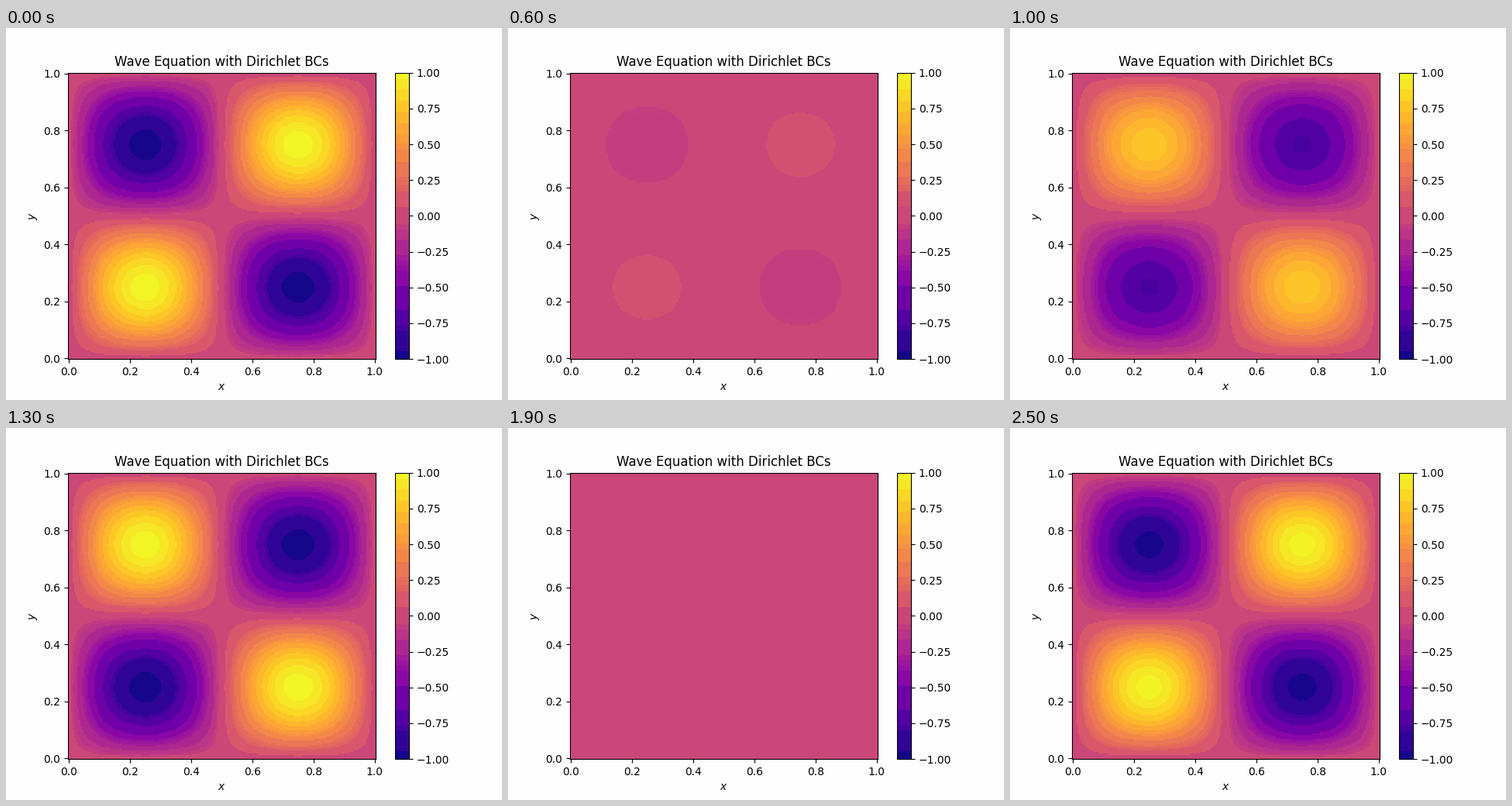
Animation of 640x480 px, one loop 2600 ms. Source, as a matplotlib script:

```python
import numpy as np
import matplotlib.pyplot as plt
from matplotlib.animation import FuncAnimation
from matplotlib.colors import ListedColormap

FRAMES = 26
INTERVAL = 100
CELLS = 201
START_PHASE = 1.5    # degrees
PHASE_STEP = 13.97   # degrees per frame
BAR_WEIGHT = 27      # colorbar pixels per colour
CELL_WEIGHT = 396.8 * 369.6 / CELLS**2

axis = np.linspace(0, 1, CELLS)
x, y = np.meshgrid(axis, axis)
mode = np.sin(2 * np.pi * x) * np.sin(2 * np.pi * y)

plasma = np.round(plt.get_cmap("plasma")(np.arange(256))[:, :3] * 255).astype(int)
# Coarse colour cells: 3 bits of red, 4 of green, 3 of blue.
_, cell_of = np.unique(plasma // [32, 16, 32], axis=0, return_inverse=True)
cell_of = cell_of.ravel()


def displacement(frame):
    return mode * np.cos(np.radians(START_PHASE + PHASE_STEP * frame))


def banded_cmap(field):
    """Plasma reduced to the mean colour of each coarse colour cell."""
    index = np.clip((field + 1) * 128, 0, 255).astype(int)
    weight = BAR_WEIGHT + CELL_WEIGHT * np.bincount(index.ravel(), minlength=256)
    total = np.bincount(cell_of, weight)
    means = [np.bincount(cell_of, weight * plasma[:, c]) / total for c in range(3)]
    colors = np.floor(np.stack(means, axis=1) + 1e-6)
    return ListedColormap(colors[cell_of] / 255)


fig, ax = plt.subplots(figsize=(6.4, 4.8), dpi=100, facecolor="#fefefe")
first = displacement(0)
mesh = ax.pcolormesh(x, y, first, cmap=banded_cmap(first), vmin=-1, vmax=1,
                     shading="nearest")
fig.colorbar(mesh, ax=ax)
ax.set_title("Wave Equation with Dirichlet BCs")
ax.set_xlabel("$x$")
ax.set_ylabel("$y$")


def update(frame):
    field = displacement(frame)
    mesh.set_array(field)
    mesh.set_cmap(banded_cmap(field))
    return (mesh,)


anim = FuncAnimation(fig, update, frames=FRAMES, interval=INTERVAL,
                     repeat=True, repeat_delay=0, blit=False)
plt.show()
```
